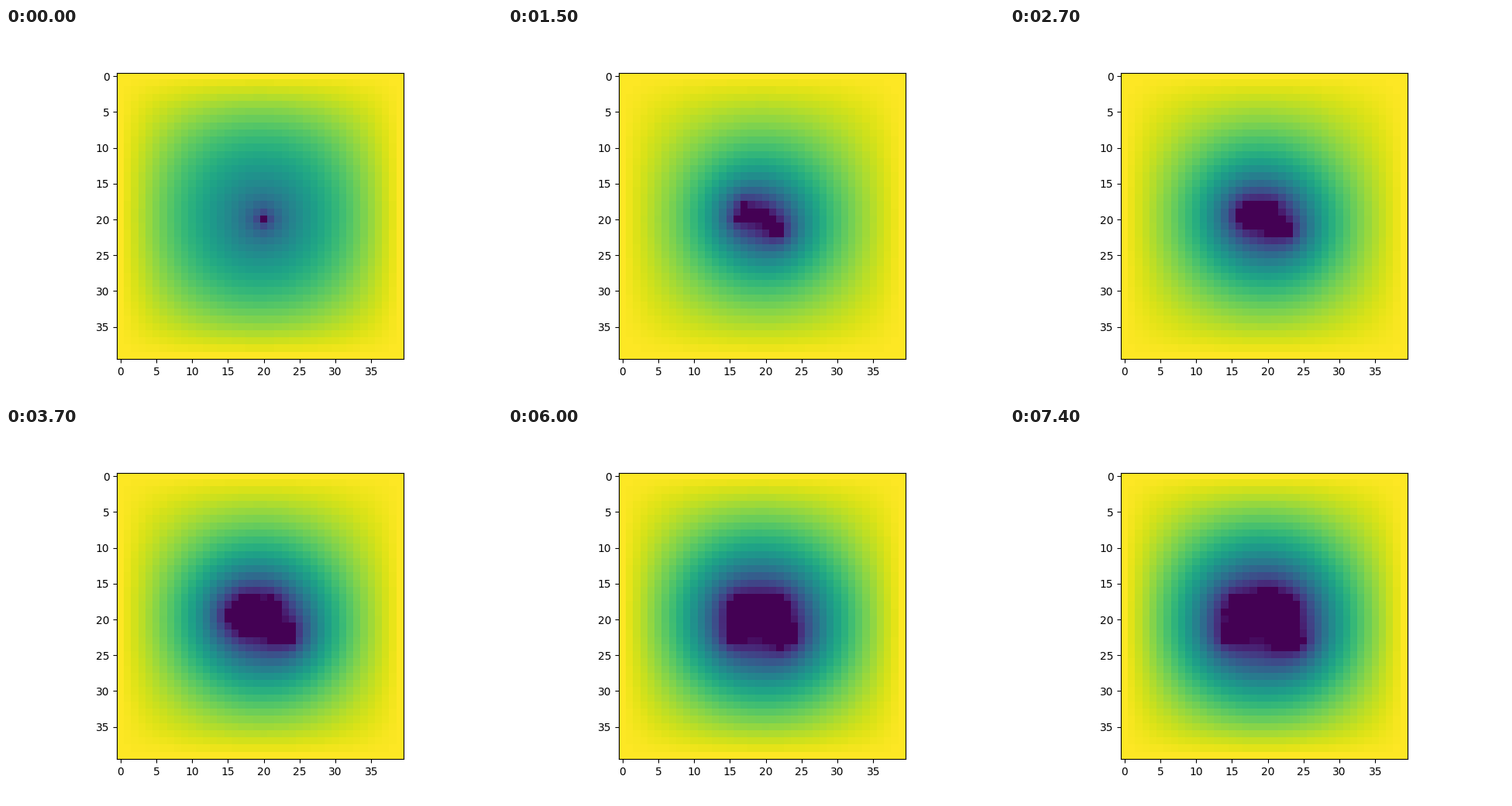
Animation, 640 px wide and 480 px high, one loop 7.5 s. Source, as a matplotlib script:

```python
import numpy as np
import matplotlib.pyplot as plt
from matplotlib.animation import FuncAnimation

SIZE = 40
STEPS = 75
SEED = SIZE // 2
TOLERANCE = 1e-3

# Reach of the cluster from its seed every 30 degrees, clockwise from the
# right, at a few key steps; it grows evenly in between.
KEY_STEPS = [0, 15, 37, 74]
KEY_REACH = np.array([
    [0.9] * 12,
    [1.5, 3.7, 2.5, 1.4, 1.2, 1.5, 4.2, 3.95, 1.5, 1.4, 1.2, 1.2],
    [2.95, 5.5, 3.6, 2.5, 2.6, 3.8, 5.55, 4.4, 4.1, 2.8, 3.5, 2.8],
    [4.05, 5.87, 5.5, 3.5, 2.9, 7.25, 5.9, 6.55, 4.4, 4.3, 4.1, 4.75],
])

rows, cols = np.indices((SIZE, SIZE))
radius = np.hypot(cols - SEED, rows - SEED)
angle = np.degrees(np.arctan2(rows - SEED, cols - SEED))
inner = (rows % (SIZE - 1) > 0) & (cols % (SIZE - 1) > 0)


def cluster_at(step):
    reach = [np.interp(step, KEY_STEPS, column) for column in KEY_REACH.T]
    return radius <= np.interp(angle, np.arange(0, 360, 30), reach, period=360)


def relax(field, cluster):
    """Jacobi sweeps of the Laplace equation, with the cluster held at 0."""
    free = inner & ~cluster
    field = np.where(cluster, 0, field)
    change = 1
    while change > TOLERANCE:
        mean = sum(np.roll(field, s, a) for s in (-1, 1) for a in (0, 1)) / 4
        new = np.where(free, mean, field)
        change = np.abs(new - field).max()
        field = new
    return field


def grow():
    field = np.where(inner, 0.0, 1.0)
    fields = []
    for step in range(STEPS):
        field = relax(field, cluster_at(step))
        fields.append(field)
    return fields


fields = grow()
fig, ax = plt.subplots(figsize=(6.4, 4.8), dpi=100)
image = ax.imshow(fields[0], cmap="viridis", vmin=0, vmax=1)


def update(step):
    image.set_data(fields[step])
    return [image]


anim = FuncAnimation(fig, update, frames=STEPS, interval=100,
                     repeat=True, repeat_delay=0)
plt.show()
```
